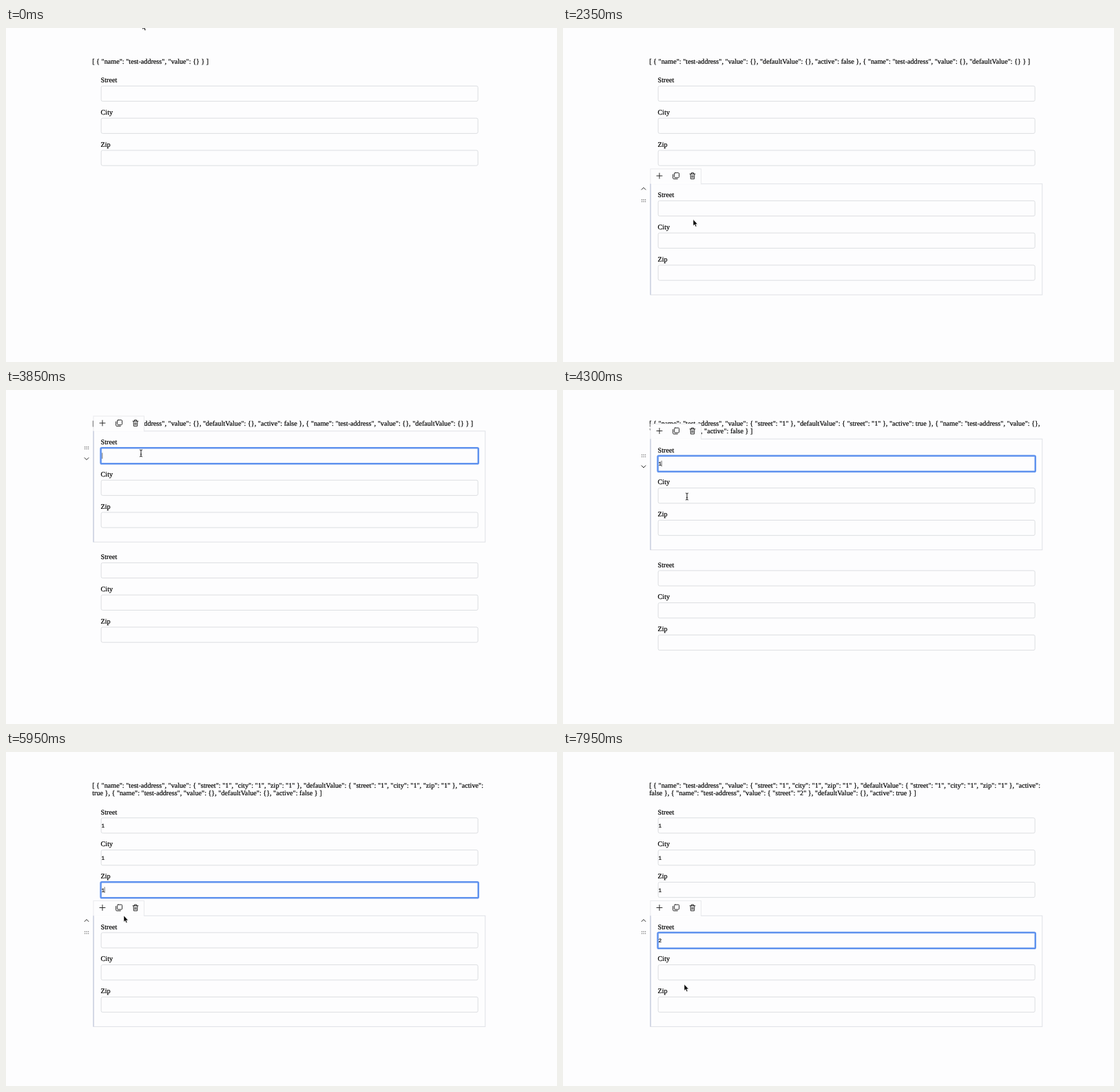
An HTML page that plays this animation: 800x486 px, repeating every 8000 ms.

```html
<!DOCTYPE html>
<html lang="en">
<head>
<meta charset="utf-8">
<title>Address blocks</title>
<style>
  html, body { margin: 0; width: 100%; height: 100%; overflow: hidden; background: #fdfdfe; }
  #stage { position: absolute; left: 0; top: 0; width: 800px; height: 486px; overflow: hidden; }
  #json {
    position: absolute; left: 125.2px; top: 43.8px; width: 572px;
    font: 10.16px/11.43px "Liberation Serif", Times, serif;
    color: #000; text-rendering: geometricPrecision; -webkit-text-stroke: .2px #000;
  }
  svg { position: absolute; left: 0; top: 0; }
  text { text-rendering: geometricPrecision; stroke: #000; stroke-width: .2; }
  .label { font: 10.16px "Liberation Serif", Times, serif; }
  .value { font: 7.7px "Liberation Sans", Arial, sans-serif; }
  .input { fill: #fdfdfe; stroke: #dcdee1; }
  .focus { fill: #fdfdfe; stroke: #5f92ee; stroke-width: 2.5; }
  .frame { fill: none; stroke: #dfe1e6; }
  .bar { fill: #fdfdfe; stroke: #e9eaed; }
  .edge { stroke: #c9cfe0; stroke-width: 1.4; }
  .icon { fill: none; stroke: #2b2b2b; stroke-linecap: round; stroke-linejoin: round; }
  .dots { stroke: #777; stroke-width: 1.3; stroke-dasharray: 1.3 1.2; }
</style>
</head>
<body>
<div id="stage">
  <div id="json"></div>
  <svg id="view" width="800" height="486" viewBox="0 0 800 486"></svg>
</div>
<script>
const LOOP = 8000, STEP = 50;
const TOP = 59.8, LINE = 11.43, PITCH = 167, ROW = 46.8;
const LABELS = ["Street", "City", "Zip"];
const ENTER = 300, ADD = 1550, ERASE = 7250, GLIDE = 400;

// Each field is clicked, then typed into after a short delay.
const CLICKS = [3850, 4550, 5400, 6250], TYPE = 150;

// Pointer stops: arrival time and place
const STOPS = [
  [0, 198, -7], [350, 172, 82], [750, 139.5, 52.5], [1950, 139.5, 52.5],
  [2350, 189, 278.5], [2800, 196, 287], [3400, 196, 92], [4300, 180, 155],
  [4950, 170, 202], [6150, 172, 274], [6550, 178, 315], [6700, 177, 304.5], [7900, 176, 338]
];

const jsonBox = document.getElementById("json");
const view = document.getElementById("view");

// Rest at a stop, then glide into the next one.
function pointer(t) {
  let [t0, x, y] = STOPS[0];
  for (const [t1, x1, y1] of STOPS) {
    const u = Math.min(1, Math.max(0, 1 - (t1 - t) / Math.min(GLIDE, t1 - t0 || 1)));
    const k = u * u * (3 - 2 * u);
    x += (x1 - x) * k;
    y += (y1 - y) * k;
    t0 = t1;
  }
  return [x, y];
}

function fieldValue(i, t) {
  if (t < CLICKS[i] + TYPE) return null;
  if (i < 3 || t < ERASE) return "1";
  return t < ERASE + TYPE ? "" : "2";
}

function caretOn(t) {
  const keys = [...CLICKS, ERASE].flatMap(c => [c, c + TYPE]);
  return (t - Math.max(...keys.filter(k => k <= t))) % 1000 < 500;
}

function format(v) {
  if (Array.isArray(v)) return `[ ${v.map(format).join(", ")} ]`;
  if (typeof v !== "object") return JSON.stringify(v);
  const parts = Object.entries(v).map(([k, x]) => `"${k}": ${format(x)}`);
  return parts.length ? `{ ${parts.join(", ")} }` : "{}";
}

function model(t, values) {
  const item = (value, extra) => ({ name: "test-address", value, ...extra });
  if (t <= ADD) return [item({})];
  if (values[0] === null) {
    return [item({}, { defaultValue: {}, active: false }), item({}, { defaultValue: {} })];
  }
  const blocks = [{}, {}];
  values.forEach((v, i) => {
    if (v !== null) blocks[i < 3 ? 0 : 1][LABELS[i % 3].toLowerCase()] = v;
  });
  const moved = values[3] !== null;
  return [
    item(blocks[0], { defaultValue: blocks[0], active: !moved }),
    item(blocks[1], { defaultValue: {}, active: moved })
  ];
}

const inputTop = (top, i) => top + 24.6 + (i % 3) * ROW + (i > 2 ? PITCH : 0);

function field(top, i, value, focused, caret) {
  const y = inputTop(top, i), cx = value ? 143.2 : 139.8;
  const box = focused
    ? `<rect class="focus" x="137.6" y="${y - .1}" width="548.2" height="23" rx="1.6"/>`
    : `<rect class="input" x="138.2" y="${y}" width="547" height="22.2" rx="2.2"/>`;
  return `<text class="label" x="137.6" y="${y - 5.2}">${LABELS[i % 3]}</text>${box}` +
    (value ? `<text class="value" x="138.8" y="${y + 14.2}">${value}</text>` : "") +
    (focused && caret ? `<path d="M${cx} ${y + 7}v8.6" stroke="#333" stroke-width=".7"/>` : "");
}

function chrome(top, index, count, ring) {
  const arrow = index ? "M114.1 8.4l2.9-3 2.9 3" : "M114.1 38.8l2.9 3 2.9-3";
  return `<g transform="translate(0 ${top})">
    <rect class="frame" x="127" y="0" width="568.8" height="161.4"/>
    <rect class="bar" x="127" y="-21.8" width="73.5" height="21.8"/>
    <rect x="127.6" y="-1" width="72.4" height="2" fill="#fdfdfe"/>
    <path class="edge" d="M127.1 0V161.4"/>
    ${ring ? '<rect x="129" y="-20.8" width="21.8" height="19.8" fill="none" stroke="#749ff0" stroke-width="2.4"/>' : ""}
    <g class="icon" transform="translate(0 -11.7)">
      <path d="M136 0h8M140-4v8"/>
      <rect x="161.6" y="-4.4" width="7" height="7" rx="1.2"/>
      <path d="M159.6-2v5.2q0 1.3 1.3 1.3h5.4"/>
      <path d="M184.2-2.8h7.6M186.5-2.8v-1.6h3v1.6M185.1-2.8l.3 7.3h5.2l.3-7.3M187.1-.5v3M188.9-.5v3"/>
    </g>
    <path class="dots" d="M113.9 23.2h6.3M113.9 25.9h6.3"/>
    ${count > 1 ? `<path class="icon" d="${arrow}"/>` : ""}</g>`;
}

const CURSORS = {
  arrow: '<path d="M0 0V9.3L2.1 7.4 3.5 10.7 5.1 10 3.7 6.9H6.4Z" stroke="#fff" stroke-width=".6"/>',
  beam: '<path d="M-2-5Q0-5 0-3.8 0-5 2-5M0-4V4M-2 5Q0 5 0 3.8 0 5 2 5M-1 1.4H1" fill="none" stroke="#222"/>',
  hand: '<path d="M-1 1Q0-.7 1 1V4.2Q4.5 3.4 6.3 6.2V8.3L5.2 10.6H.2L-3 6.7Q-2.8 5.3-1 6.8Z" fill="#fff" stroke="#111"/>' +
    '<path d="M1.4 6.7v2.3M3 6.7v2.3M4.5 6.7v2.3" stroke="#222" stroke-width=".6"/>'
};

function cursor(x, y, top, count) {
  const onBar = x > 127 && x < 200 && y > top - 22 && y < top;
  let kind = onBar ? "hand" : "arrow";
  for (let i = 0; i < count * 3; i++) {
    const dy = y - inputTop(top, i);
    if (!onBar && dy > 0 && dy < 22) kind = "beam";
  }
  return `<g transform="translate(${x} ${y})">${CURSORS[kind]}</g>`;
}

function draw(t) {
  const values = CLICKS.map((_, i) => fieldValue(i, t));
  const count = t > ADD ? 2 : 1;
  const top = TOP + (values[0] === null ? 0 : LINE);
  const [x, y] = pointer(t);
  const hover = count > 1 && y > top + PITCH - 12 ? 1 : 0;
  const focus = CLICKS.filter(c => c <= t).length - 1;
  const ring = t >= ADD && focus < 0 && !hover && t < ADD + 2 * GLIDE;

  jsonBox.textContent = format(model(t, values));

  let out = t < ENTER ? "" : chrome(top + hover * PITCH, hover, count, ring);
  for (let i = 0; i < count * 3; i++) {
    out += field(top, i, values[i], i === focus, caretOn(t));
  }
  // The pointer hides while the last value is retyped.
  if (t < ERASE || t >= ERASE + 3 * TYPE) out += cursor(x, y, top, count);
  view.innerHTML = out;
}

let start = null, last = -1;
function tick(now) {
  if (start === null) start = now;
  const t = Math.floor(((now - start) % LOOP) / STEP) * STEP;
  if (t !== last) draw(last = t);
  requestAnimationFrame(tick);
}
draw(0);
requestAnimationFrame(tick);
</script>
</body>
</html>
```
